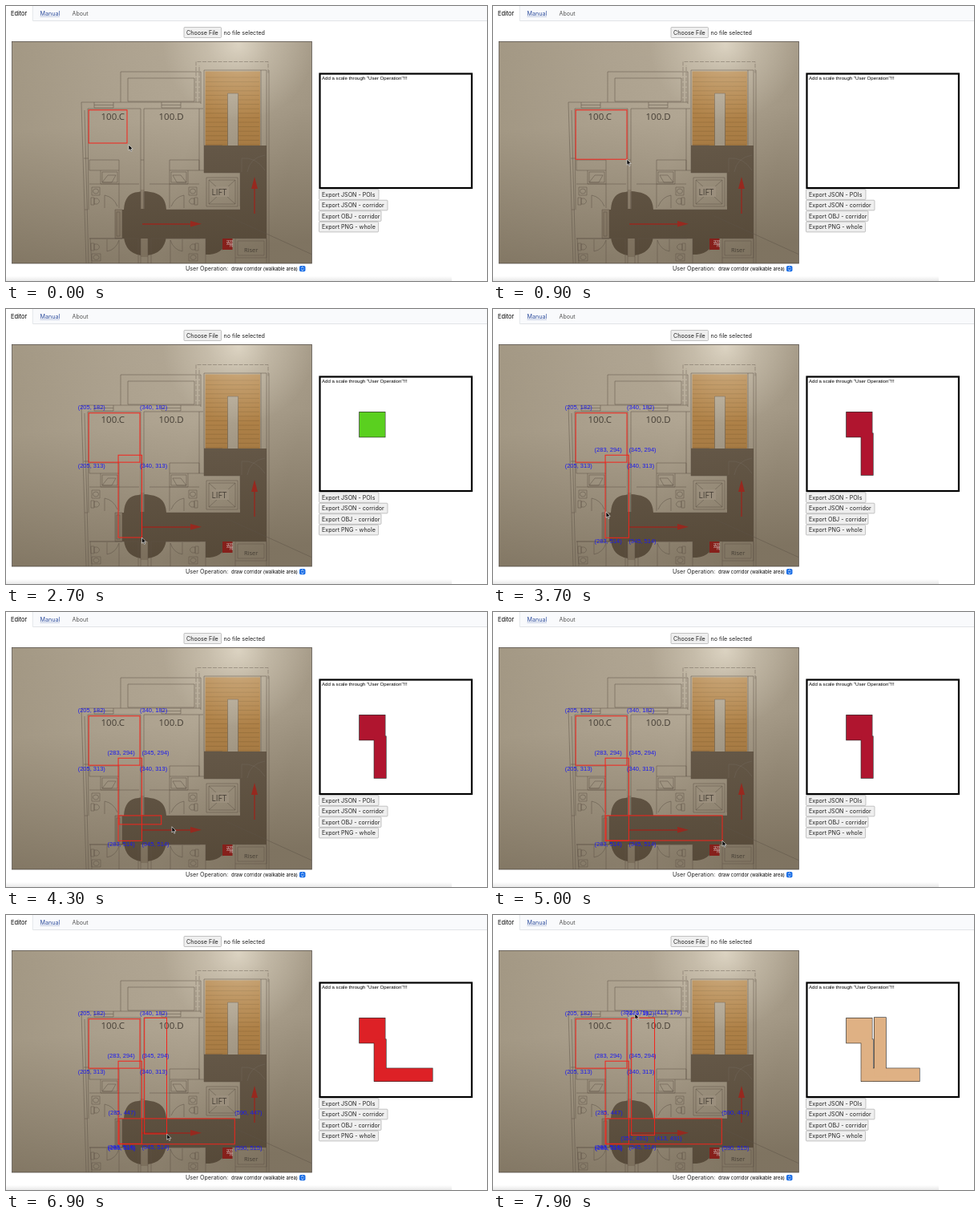
An HTML page for the animation above (8 s loop, 600 by 343 pixels).

```html
<!DOCTYPE html>
<html lang="en">
<head>
<meta charset="utf-8">
<title>Floor plan editor</title>
<style>
html, body { margin: 0; height: 100%; overflow: hidden; background: #fff; }
svg { display: block; width: 100%; height: 100%; }
text { font-family: Inter, Roboto, sans-serif; font-size: 7.15px; fill: #222; white-space: pre; }
.arial { font-family: "Liberation Sans", Arial, sans-serif; }
.plan text { font-family: "Open Sans", "Noto Sans", sans-serif; fill: #453e35; }
.label { font-size: 7.5px; fill: #1a1af0; }
.button { fill: #efefef; stroke: #a0a0a0; stroke-width: .6; }
.drag { fill: none; stroke: #f5231b; stroke-width: 1; }
.line { fill: none; stroke: #5c5347; stroke-width: .5; }
.faint { fill: none; stroke: #71675a; stroke-width: .5; }
.floor { fill: #6a5d4d; }
.wall { fill: #a09380; }
.red { fill: #96291f; }
</style>
</head>
<body>
<svg viewBox="0 0 600 343">
  <defs>
    <linearGradient id="paper" x2="1" y2=".2">
      <stop offset="0" stop-color="#a39884"/>
      <stop offset=".35" stop-color="#aea390"/>
      <stop offset=".65" stop-color="#b5aa97"/>
      <stop offset="1" stop-color="#a59a87"/>
    </linearGradient>
    <linearGradient id="shade" x2=".12" y2="1">
      <stop offset="0" stop-color="#2e2210" stop-opacity="0"/>
      <stop offset=".4" stop-color="#2e2210" stop-opacity=".03"/>
      <stop offset="1" stop-color="#2e2210" stop-opacity=".32"/>
    </linearGradient>
    <radialGradient id="glow" gradientUnits="userSpaceOnUse" cx="290" cy="48" r="95">
      <stop offset="0" stop-color="#fff8e8" stop-opacity=".55"/>
      <stop offset=".4" stop-color="#fff8e8" stop-opacity=".25"/>
      <stop offset="1" stop-color="#fff8e8" stop-opacity="0"/>
    </radialGradient>
    <linearGradient id="dock" x2="0" y2="1">
      <stop offset="0" stop-color="#000" stop-opacity="0"/>
      <stop offset="1" stop-color="#000" stop-opacity=".09"/>
    </linearGradient>
    <clipPath id="photo"><rect x="8" y="44.5" width="373" height="276.5"/></clipPath>
    <g id="bath">
      <path d="M104 205V192H141V205M118 205H141V222H118ZM120 207H139V220H120ZM120 220L127 211H137L132 220ZM104 222H166M104 205H118M141 222V252"/>
      <path d="M107 226H117V236H107ZM106 239H110V248H106ZM110 240H114Q119 243.500 114 247H110ZM123 252V236Q134 238 139 250"/>
      <ellipse cx="112" cy="231" rx="3.500" ry="3"/>
    </g>
    <g id="lower">
      <path d="M104 290H165V321M106 296H110V305H106ZM110 297H114Q119 300.500 114 304H110ZM107 309H118V318H107ZM126 291V306Q137 304 141 292M141 292V321"/>
      <ellipse cx="112.500" cy="313.500" rx="3.500" ry="3"/>
    </g>
  </defs>

  <!-- Page controls -->
  <rect width="600" height="18.500" fill="#f9fafc"/>
  <path d="M33.500 18.500H600" stroke="#dcdfe3" stroke-width=".8"/>
  <path d="M0 0H33V19H0Z" fill="#fff"/>
  <path d="M33.300 0V18.500" stroke="#dcdfe3" stroke-width=".7"/>
  <rect y="337" width="556" height="6" fill="url(#dock)"/>
  <text x="6" y="11.800" style="font-size:7.400px;fill:#000">Editor</text>
  <text x="42.500" y="11.800" style="fill:#2c4c9c">Manual</text>
  <path d="M42.500 13.200H67" stroke="#8496c6" stroke-width=".5"/>
  <text x="82.500" y="11.800" style="fill:#555">About</text>
  <rect class="button" x="222" y="26.500" width="46.500" height="13" rx="1"/>
  <text x="225" y="35.700">Choose File</text>
  <text x="271.500" y="35.700">no file selected</text>
  <text x="224" y="330">User Operation:</text>
  <text x="281" y="330.200" style="font-size:5.950px;fill:#000">draw corridor (walkable area)</text>
  <rect x="366" y="324" width="7.500" height="7.200" rx="1.800" fill="#1c6fe6"/>
  <path d="M368.200 326.800L369.750 325.400L371.300 326.800M368.200 328.600L369.750 330L371.300 328.600" fill="none" stroke="#fff" stroke-width=".8"/>
  <g id="exports"></g>

  <!-- Photographed floor plan -->
  <g class="plan" clip-path="url(#photo)">
    <rect x="8" y="44" width="374" height="278" fill="url(#paper)"/>
    <path class="floor" d="M247 174H325V290H145V254H147Q148 233 165 232Q172 230 180 232Q199 234 200 254H292V208H247Z"/>
    <path class="floor" d="M147 288Q149 308 168 311H176Q197 309 200 288ZM249 289H270V303Q262 311 249 310Z"/>
    <path class="wall" d="M168 229H172.500V253H168ZM168 290H177V313H168ZM136 254H145V290H136Z"/>
    <path d="M248.500 81.500H317V174H289.500V109H276.500V174H248.500Z" fill="#b4854a"/>
    <path id="treads" fill="none" stroke="#8d6837" stroke-width=".5"/>
    <path class="line" d="M276.500 174V109H289.500V174"/>
    <rect x="8" y="44" width="374" height="278" fill="url(#shade)"/>
    <rect x="8" y="44" width="374" height="278" fill="url(#glow)"/>
    <path class="faint" d="M237 120V69.500H327V84M241 120V74" stroke-dasharray="5 1.500"/>
    <path class="line" d="M247 208V80H325V321M318 174V80M328 80V321M247 208H292V250M247 174H270"/>
    <path class="line" d="M143 120V82H243V122M152 119V90H235V119ZM100 321L94 120H243M103 254L102 128H168V254M172 254V128H241V205M98 130L103 321M105 290L107 321"/>
    <path class="line" d="M110 120V127H134V120M110 123.500H134M194 120V127H218V120M194 123.500H218M168 192H172M241 128H246M241 205H247M97 190H103M98 254H102M104 290H145"/>
    <path class="line" d="M136 254H145V290H136ZM138 257H142V287H138ZM200 254H292M200 290H249M172 232V254M168 290V321M177 290V321"/>
    <g class="line"><use href="#bath"/><use href="#bath" transform="matrix(-1 0 0 1 345 0)"/></g>
    <g class="line"><use href="#lower"/><use href="#lower" transform="matrix(-1 0 0 1 346 0)"/></g>
    <path class="line" d="M250 214H289V250H250ZM253 217H286V247H253ZM253 217L286 247M286 217L253 247"/>
    <rect x="256" y="225" width="22" height="13" fill="#9b8f7d"/>
    <path class="line" d="M286 290H325V314H286ZM289 293H322V311H289ZM249 289V321M286 314V321M270 289V305"/>
    <path class="faint" d="M301 207Q304 189 323 186M294 207V190Q312 188 323 205"/>
    <path class="line" d="M274 261L382 310"/>
    <text x="118.500" y="142" style="font-size:11.500px">100.C</text>
    <text x="190.500" y="142" style="font-size:11.500px">100.D</text>
    <text x="256.500" y="235.500" style="font-size:10px">LIFT</text>
    <text x="297" y="306.500" style="font-size:7.500px">Riser</text>
    <path class="red" d="M170 271.300H230V268L244 271.700L230 275.600V272.700H170ZM309.300 259V228H306L310 213L314 228H310.700V259Z"/>
    <rect x="270" y="290" width="12.500" height="14" fill="#86201b"/>
    <text transform="translate(274.500 292)rotate(90)" style="font-size:4.500px;fill:#ddd">HR</text>
    <text transform="translate(278.500 292)rotate(90)" style="font-size:4.500px;fill:#ddd">FIRE</text>
  </g>
  <rect x="7.500" y="44.500" width="374" height="276.500" fill="none" stroke="#544d44" stroke-width=".8"/>

  <!-- Preview -->
  <rect x="391.500" y="84.500" width="189.500" height="142.500" fill="#fff" stroke="#000" stroke-width="2.200"/>
  <text class="arial" x="394" y="92" style="font-size:6.100px;fill:#000">Add a scale through "User Operation"!!!</text>
  <g id="preview"></g>
  <g id="drawing"></g>
  <path id="cursor" d="M0 0V7.200L1.700 5.700L2.900 8.400L4.100 7.900L2.900 5.300H5.200Z" stroke="#fff" stroke-width=".6"/>
</svg>
<script>
const LOOP = 8000, STEP = 100;
const get = id => document.getElementById(id);

get("exports").innerHTML = [["JSON - POIs", 74.5], ["JSON - corridor", 85.5], ["OBJ - corridor", 77.5], ["PNG - whole", 74]]
  .map(([name, width], i) => {
    const y = 228.7 + i * 13.5;
    return `<rect class="button" x="390.500" y="${y}" width="${width}" height="12.700" rx="1"/>
      <text x="394" y="${y + 8.9}">Export ${name}</text>`;
  }).join("");

let treads = "";
for (let y = 89; y < 173; y += 5.6) treads += y < 108 ? `M249 ${y}H316` : `M249 ${y}H276M290 ${y}H316`;
get("treads").setAttribute("d", treads);

// Rectangles in image pixels: left, top, right, bottom, drag start, release
const areas = [
  [205, 182, 340, 313, -1000, 1000],
  [283, 294, 345, 514, 1600, 2800],
  [285, 447, 590, 515, 3800, 5200],
  [352, 179, 413, 491, 6200, 7300]
];
const fills = ["#5ad01f", "#b0152f", "#dd2126", "#dfb184"];

// Pointer path: time, x, y
const path = [
  [-100, 151, 171], [0, 153, 173], [700, 167, 191.2], [1000, 167, 191.2],
  [1500, 140.2, 182], [1600, 140.2, 182], [1700, 144, 188], [1800, 150, 199],
  [2600, 169.5, 285], [2900, 169.5, 285], [3500, 141, 252.5], [3800, 141, 253.4],
  [4900, 286, 285], [5300, 286, 285], [6000, 172.5, 128], [6200, 172.5, 128],
  [6800, 200.5, 273], [7300, 201.5, 273.5], [7900, 177, 123]
];

const stageX = x => 6.2 + x * .473, stageY = y => 44.5 + y * .4685;
const miniX = x => 392.4 + x * .2365, miniY = y => 85.7 + y * .2362;

function pointer(t) {
  const i = Math.max(1, path.findIndex(p => p[0] >= t));
  const [t0, x0, y0] = path[i - 1], [t1, x1, y1] = path[i];
  const k = (t - t0) / (t1 - t0);
  return [x0 + (x1 - x0) * k, y0 + (y1 - y0) * k];
}

const box = (x0, y0, x1, y1, attrs) =>
  `<rect x="${Math.min(x0, x1)}" y="${Math.min(y0, y1)}" width="${Math.abs(x1 - x0)}" height="${Math.abs(y1 - y0)}" ${attrs}/>`;

const label = (x, y, dx, dy) =>
  `<text class="label arial" x="${stageX(x) + dx}" y="${stageY(y) + dy}">(${x}, ${y})</text>`;

function draw(t) {
  const [x, y] = pointer(t), lagged = pointer(t - STEP);
  let drawing = "", labels = "";
  for (const [l, top, r, b, start, end] of areas) {
    if (t < start) continue;
    const done = t >= end;
    const corner = done ? [stageX(r), stageY(b)] : lagged;
    drawing += box(stageX(l), stageY(top), ...corner, 'class="drag"');
    if (done) labels += label(l, top, -13.5, -4.5) + label(r, top, 0, -4.5) + label(l, b, -13.5, 6.9) + label(r, b, 0, 6.9);
  }
  get("drawing").innerHTML = drawing + labels;

  // Outlines first, fills on top: only the border of the union stays visible
  const finished = areas.filter(a => t >= a[5]);
  const layer = attrs => finished.map(([l, top, r, b]) => box(miniX(l), miniY(top), miniX(r), miniY(b), attrs)).join("");
  get("preview").innerHTML = layer('fill="none" stroke="#222" stroke-width="1.200"') + layer(`fill="${fills[finished.length - 1]}"`);
  get("cursor").setAttribute("transform", `translate(${x} ${y})`);
}

const begin = performance.now();
function tick() {
  const t = (performance.now() - begin) % LOOP;
  draw(Math.floor(t / STEP) * STEP);
  requestAnimationFrame(tick);
}
tick();
</script>
</body>
</html>
```
